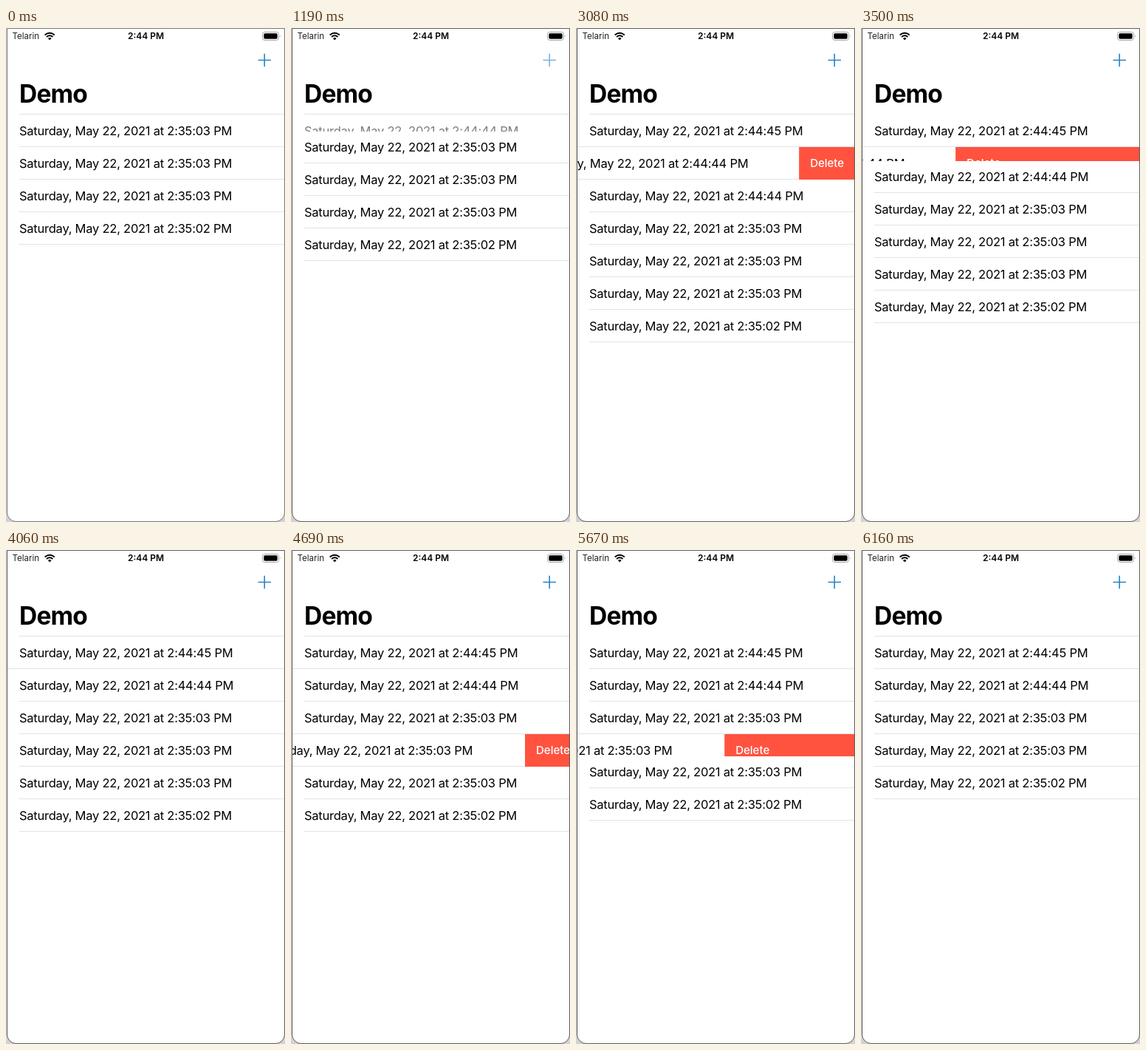
An HTML page that plays this animation: 378x668 px, repeating every 6440 ms.

```html
<!DOCTYPE html>
<html lang="en">
<head>
<meta charset="utf-8">
<title>Demo list</title>
<style>
  * { box-sizing: border-box; }
  html, body { margin: 0; width: 100%; height: 100%; overflow: hidden; background: #d2d2d2; }
  body { position: relative; font-family: Inter, Roboto, sans-serif; color: #000; }

  /* Every animation shares the same loop length. */
  .screen, .plus, .row, .slide, .top-line, .rest { animation: 6440ms linear infinite; }

  .screen {
    position: absolute; left: 1px; top: 0; width: 377px; height: 668px; overflow: hidden;
    background: #fff; border: 1px solid #777; border-radius: 0 0 13px 13px;
    animation-name: focus;
  }
  .screen > * { position: absolute; }
  .status { font-size: 12px; line-height: 16px; top: 2px; white-space: pre; }
  .network { left: 6.5px; font-size: 11.5px; color: #222; }
  .clock { left: 0; width: 375px; text-align: center; font-weight: 600; }
  .icons { left: 0; top: 0; }
  .plus { animation-name: press; }
  h1 { margin: 0; left: 16px; top: 68px; font-size: 33.5px; line-height: 40px; font-weight: 700; letter-spacing: -.8px; }

  .line, .top-line, .rest { height: 1px; background: #e3e3e5; }
  .top-line { left: 16px; right: 0; top: 115px; animation-name: header; }
  .rest { left: 0; width: 16px; top: 159px; opacity: 0; animation-name: rest; }

  .list { left: 0; top: 116px; width: 375px; }
  .row { position: relative; height: 44px; clip-path: inset(-1px 0 0 0); }
  .slide { position: absolute; left: 0; top: 0; width: 375px; height: 44px; }
  .text {
    position: absolute; left: 16px; top: 0; line-height: 44px;
    font-size: 16.5px; letter-spacing: -.24px; white-space: pre;
  }
  .line { position: absolute; left: 16px; right: 0; top: 43px; }
  .line.above { top: -1px; }
  .delete {
    position: absolute; left: 100%; top: 0; width: 400px; height: 44px; padding-left: 15px;
    background: #ff5340; color: #fff; font-size: 15px; font-weight: 500; line-height: 44px;
  }

  .add1 { animation-name: add1; }
  .add2 { animation-name: add2; }
  .add3 { animation-name: add3; }
  .cut { animation-name: cut; }
  .add2 .slide { animation-name: swipe1; }
  .cut .slide { animation-name: swipe2; }

  @keyframes focus {
    0%, 13.03% { border-color: #777; }
    13.04%, 100% { border-color: #5c5c5c; }
  }
  @keyframes press {
    0%, 15.2% { opacity: 1; }
    15.22%, 16.5% { opacity: .25; }
    20.6%, 22.8% { opacity: 1; }
    22.83%, 23.6% { opacity: .25; }
    26.5%, 27.3% { opacity: 1; }
    27.33%, 28% { opacity: .25; }
    31.5%, 100% { opacity: 1; }
  }

  @keyframes add1 {
    0%, 16.3% { height: 0; opacity: 0; animation-timing-function: ease-in-out; }
    20.65%, 100% { height: 44px; opacity: 1; }
  }
  /* This row is added and later deleted. */
  @keyframes add2 {
    0%, 23.45% { height: 0; opacity: 0; animation-timing-function: ease-in-out; }
    27.8%, 51.24% { height: 44px; opacity: 1; animation-timing-function: ease; }
    60.55%, 100% { height: 0; opacity: 1; }
  }
  @keyframes add3 {
    0%, 27.8% { height: 0; opacity: 0; animation-timing-function: ease-in-out; }
    31.9%, 100% { height: 44px; opacity: 1; }
  }
  @keyframes cut {
    0%, 86.02% { height: 44px; animation-timing-function: ease; }
    95.34%, 100% { height: 0; }
  }

  @keyframes swipe1 {
    0%, 38.82% { transform: none; animation-timing-function: ease-in-out; }
    48.14%, 51.24% { transform: translateX(-75px); animation-timing-function: ease; }
    60.55%, 100% { transform: translateX(-375px); }
  }
  @keyframes swipe2 {
    0%, 67.08% { transform: none; animation-timing-function: ease-in-out; }
    72.83%, 74.53% { transform: translateX(-60px); animation-timing-function: ease-out; }
    80.75%, 86.02% { transform: translateX(-74px); animation-timing-function: ease; }
    95.34%, 100% { transform: translateX(-375px); }
  }

  @keyframes header {
    0%, 49.99% { opacity: 1; }
    50%, 59.7% { opacity: 0; }
    59.78%, 84.7% { opacity: 1; }
    84.75%, 95.5% { opacity: 0; }
    95.6%, 100% { opacity: 1; }
  }
  @keyframes rest {
    0%, 60.55% { opacity: 0; }
    63.04%, 74.9% { opacity: 1; }
    75%, 100% { opacity: 0; }
  }
</style>
</head>
<body>
<div class="screen">
  <div class="status network">Telarin</div>
  <div class="status clock">2:44 PM</div>
  <svg class="icons" width="375" height="60" viewBox="2 1 375 60" fill="none">
    <g stroke="#000" stroke-width="2">
      <path d="M52.6 9.4Q59.2 4 65.8 9.4"/>
      <path d="M55 12Q59.2 8.5 63.4 12"/>
    </g>
    <path d="M56.9 13.9Q59.2 12.1 61.5 13.9L59.2 16.4Z" fill="#000"/>
    <rect x="347.5" y="5.5" width="22" height="11" rx="3" stroke="#a5a5a5"/>
    <rect x="349.3" y="7.3" width="18.4" height="7.4" rx="1.6" fill="#000"/>
    <path d="M371 9.2Q372.6 11 371 12.8Z" fill="#a5a5a5"/>
    <path class="plus" d="M341.5 43.5H359M350.2 34.7V52.3" stroke="#2584c6" stroke-width="1.6"/>
  </svg>
  <h1>Demo</h1>
  <div class="top-line"></div>
  <div class="list">
    <div class="row add3"><span class="text">Saturday, May 22, 2021 at 2:44:45 PM</span><i class="line"></i></div>
    <div class="row add2"><div class="slide">
      <i class="line above"></i><span class="text">Saturday, May 22, 2021 at 2:44:44 PM</span><i class="line"></i><b class="delete">Delete</b>
    </div></div>
    <div class="row add1"><span class="text">Saturday, May 22, 2021 at 2:44:44 PM</span><i class="line"></i></div>
    <div class="row"><span class="text">Saturday, May 22, 2021 at 2:35:03 PM</span><i class="line"></i></div>
    <div class="row cut"><div class="slide">
      <i class="line above"></i><span class="text">Saturday, May 22, 2021 at 2:35:03 PM</span><i class="line"></i><b class="delete">Delete</b>
    </div></div>
    <div class="row"><span class="text">Saturday, May 22, 2021 at 2:35:03 PM</span><i class="line"></i></div>
    <div class="row"><span class="text">Saturday, May 22, 2021 at 2:35:02 PM</span><i class="line"></i></div>
  </div>
  <div class="rest"></div>
</div>
</body>
</html>
```
